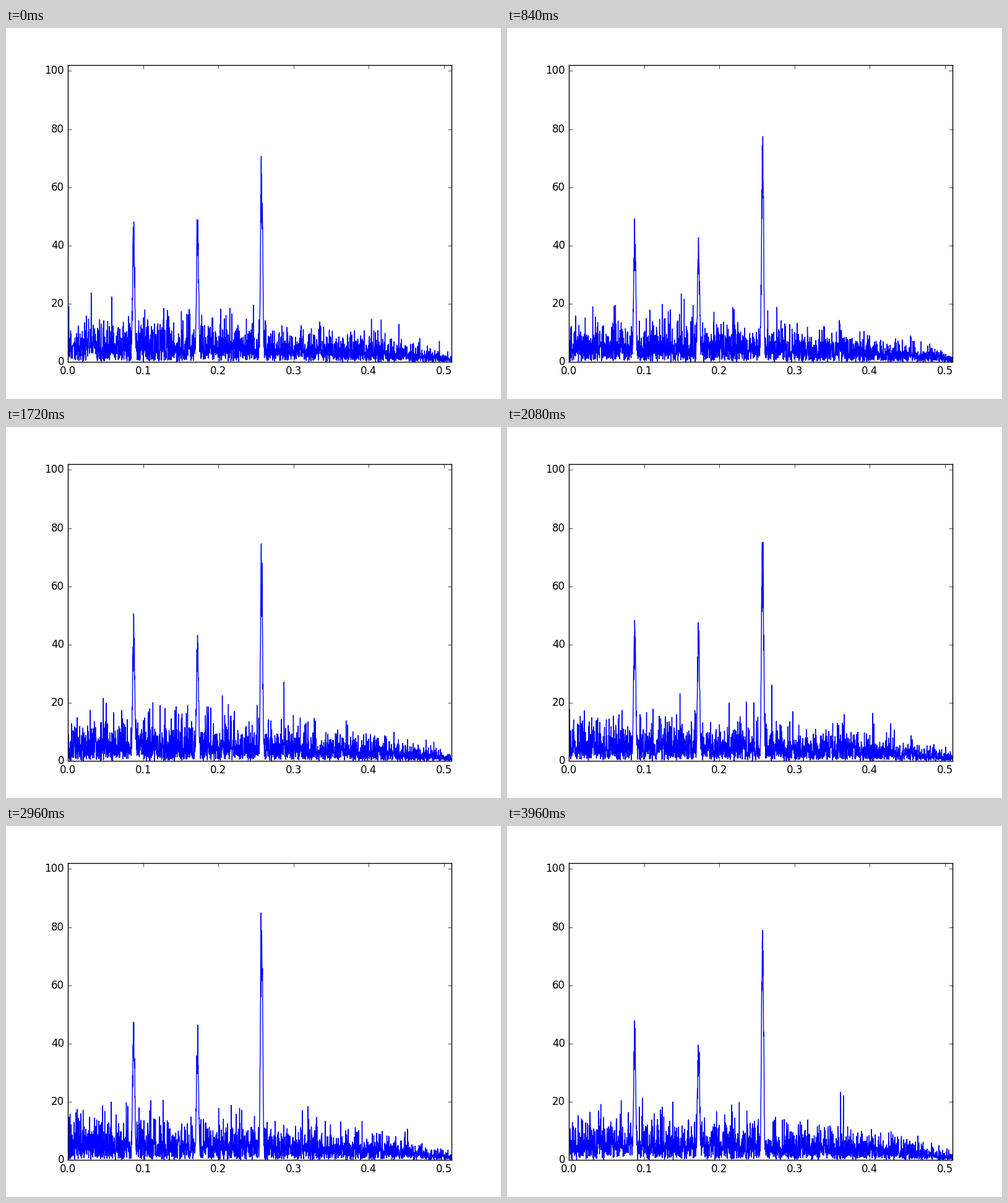
Write a matplotlib script that moves like this. It is 800 px wide and 600 px high and loops after 4000 ms.

```python
import numpy as np
import matplotlib.pyplot as plt
from matplotlib.animation import FuncAnimation

plt.style.use("classic")
plt.rcParams.update({
    "figure.dpi": 100,
    "savefig.dpi": 100,
    "figure.facecolor": "white",
    "savefig.facecolor": "white",
    "font.family": "DejaVu Sans",
    "font.size": 12,
})

FRAMES, STEP_MS = 100, 40
F_MAX, Y_MAX = 0.51, 102
PX = F_MAX / 620                        # frequency per pixel

# Centre frequency, mean height and spread of each tone.
TONES = ((0.0875, 52, 3.6), (0.1724, 44, 4), (0.2575, 79, 4.5))

freq = np.linspace(0, F_MAX, 2090)
envelope = np.sqrt(1 - (freq / 0.514) ** 2)


def add_tone(spectrum, centre, height, rng):
    """Raise a narrow, ragged peak out of the noise."""
    dist = np.abs(freq - centre) / PX
    near = dist < 4.5
    bell = np.exp(-(dist[near] / 2.5) ** 2.5)
    bell *= rng.uniform(0.62, 1, bell.size)
    bell *= height / bell.max()
    spectrum[near] = np.maximum(bell, spectrum[near])


def spectrum_at(i):
    rng = np.random.default_rng(500 + i)
    spectrum = 6 * envelope * rng.weibull(1.4, freq.size)
    for centre, mean, spread in TONES:
        add_tone(spectrum, centre, rng.normal(mean, spread), rng)
    return spectrum


fig, ax = plt.subplots(figsize=(8, 6), dpi=100)
line, = ax.plot(freq, spectrum_at(0), color="#0000ff", lw=1)
ax.set_xlim(0, F_MAX)
ax.set_ylim(0, Y_MAX)
ax.set_xticks(np.arange(6) / 10)
ax.set_yticks(range(0, 101, 20))
ax.tick_params(axis="y", pad=4.25)


def update(i):
    line.set_ydata(spectrum_at(i))
    return line,


anim = FuncAnimation(fig, update, frames=FRAMES, interval=STEP_MS,
                     init_func=lambda: update(0), repeat=True,
                     repeat_delay=0, blit=False)
plt.show()
```
